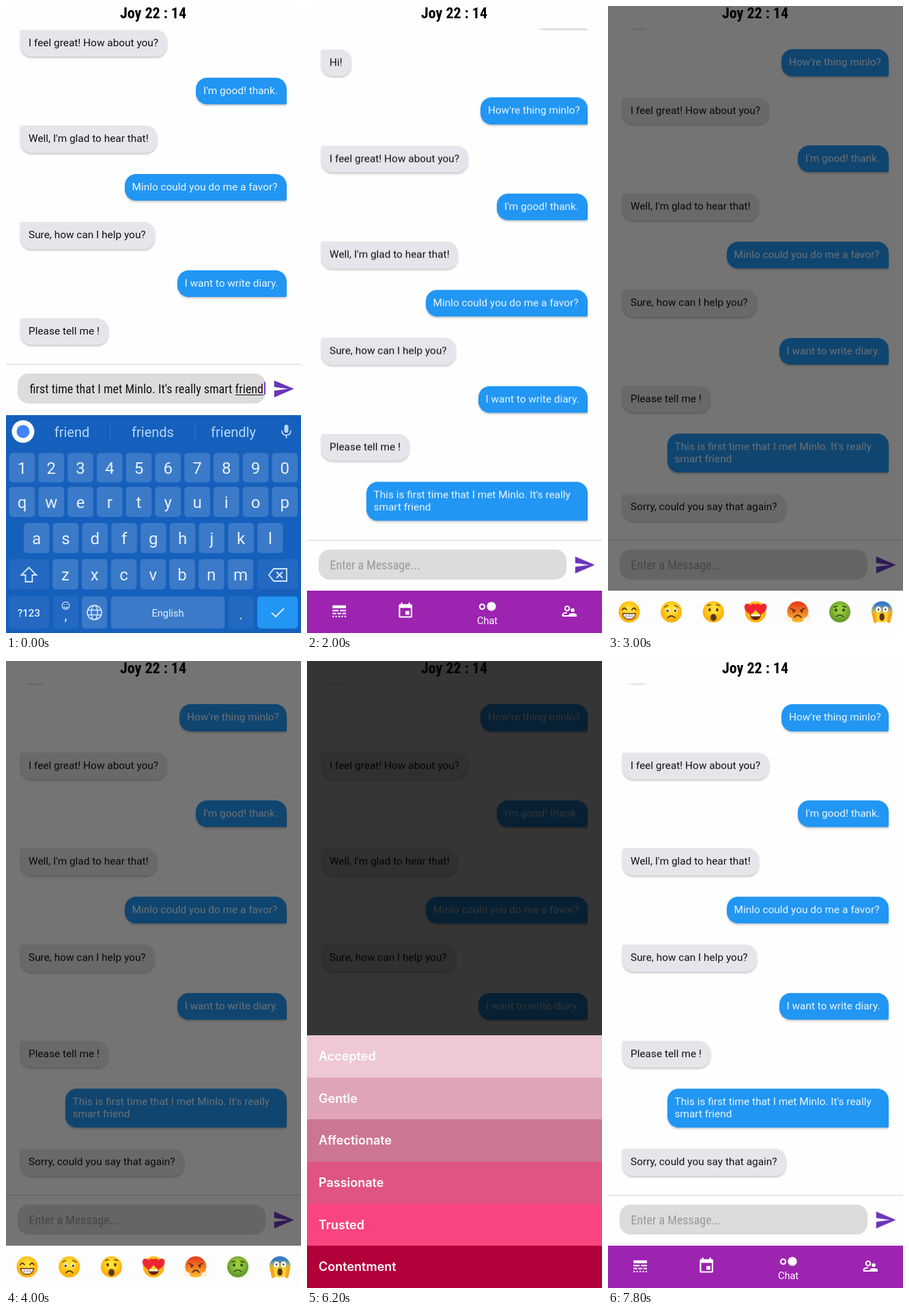
An HTML page that plays this animation: 432x918 px, repeating every 7.9 s.

```html
<!DOCTYPE html>
<html lang="en">
<head>
<meta charset="utf-8">
<title>Diary chat</title>
<style>
html, body { margin: 0; width: 100%; height: 100%; overflow: hidden; background: #fefefe; }
#stage { position: absolute; left: 0; top: 0; width: 432px; height: 918px; overflow: hidden;
  background: #fefefe; font: 15.4px/17.6px Roboto, sans-serif; color: #111; text-wrap: nowrap; }
#stage > *, #bar > * { position: absolute; }
#feed, #bar, #draft, #hint, #board, .dim, .sheet { animation: 7.9s step-end infinite; }

.narrow { font-family: "Roboto Condensed", Roboto, sans-serif; font-stretch: 75%; }
#title { left: 0; top: -3px; width: 431px; text-align: center; font-size: 22px; font-weight: 700; line-height: 27px; color: #000; }

#view { left: 0; top: 33px; width: 432px; height: 885px; overflow: hidden; }
#feed { position: absolute; top: -209.5px; left: 21px; width: 389.5px; animation-name: feed; }
.msg { box-sizing: border-box; margin-bottom: 31.03px; padding: 10.9px 0 10.9px 12px; background: #e6e5eb;
  border-radius: 3px 16.5px 16.5px; box-shadow: 0 2px 3px rgba(0,0,0,.22); }
.mine { margin-left: auto; padding-left: 11px; background: #2196f3; color: #eef7ff; border-radius: 16.5px 16.5px 2px 16.5px; }

#bar { left: 0; top: 523.5px; width: 432px; height: 76px; background: #fefefe; animation-name: bar; }
#bar::before { content: ""; position: absolute; top: 0; width: 432px; height: 1px; background: #d2d2d2; }
#field { left: 17px; top: 14.5px; width: 363px; height: 43.5px; border-radius: 16px; background: #dcdcdc; overflow: hidden; font-size: 18px; line-height: 45px; }
#draft { position: absolute; left: 16px; right: 0; height: 44px; overflow: hidden; animation-name: gone; }
#draft span { position: absolute; right: 3px; width: max-content; }
#draft u { text-underline-offset: 2px; text-decoration-thickness: 1px; }
#draft i { position: absolute; right: 0; top: 12px; width: 2px; height: 19px; background: #8a35c8; }
#hint { position: absolute; left: 16.5px; color: #999; opacity: 0; animation-name: shown; }
#send { left: 390.3px; top: 20.5px; }

#nav { left: 0; top: 856px; background: #9c24b0; }
#board { left: 0; top: 599px; width: 432px; height: 319px; background: #1660bd; animation-name: board; }
.dim { inset: 0; background: #000; opacity: 0; }
.sheet { left: 0; bottom: 0; width: 432px; }
#moods { height: 62px; background: #fdfdfd; transform: translateY(62px); animation-name: moods; }
#dim1 { animation-name: dim1; }
#shades { transform: translateY(370px); animation-name: shades; }
#dim2 { animation-name: dim2; }
#shades div { height: 61.67px; padding-left: 17px; font: 600 18px/62px Inter, sans-serif; color: #fff; }

.a, .b, .grow { animation: 1.12857s ease-in-out infinite; }
.a { animation-name: poseA; } .b { animation-name: poseB; } .grow { animation-name: grow; }

@keyframes feed { 0% { transform: none } 3.8% { transform: translateY(169.6px) } 27.2%, 100% { transform: translateY(99.1px) } }
@keyframes bar { 0% { transform: none } 3.8%, 100% { transform: translateY(257.8px) } }
@keyframes gone { 0% { opacity: 1 } 3.8%, 100% { opacity: 0 } }
@keyframes shown { 0% { opacity: 0 } 3.8%, 100% { opacity: 1 } }
@keyframes board { 0% { transform: none } 3.8% { transform: none; animation-timing-function: ease-in } 7%, 100% { transform: translateY(320px) } }
@keyframes moods {
  0%, 28.73% { transform: translateY(62px); animation-timing-function: cubic-bezier(0,0,.2,1) }
  31.65%, 78.5% { transform: none; animation-timing-function: ease-in }
  81.6%, 100% { transform: translateY(62px) }
}
@keyframes dim1 {
  0%, 28.73% { opacity: 0; animation-timing-function: cubic-bezier(0,0,.2,1) }
  31.65%, 78.5% { opacity: .54; animation-timing-function: ease-in }
  81.6%, 100% { opacity: 0 }
}
@keyframes shades {
  0%, 55.7% { transform: translateY(370px); animation-timing-function: cubic-bezier(0,0,.2,1) }
  59.2%, 78.5% { transform: none; animation-timing-function: ease-in }
  81.6%, 100% { transform: translateY(370px) }
}
@keyframes dim2 {
  0%, 55.7% { opacity: 0; animation-timing-function: cubic-bezier(0,0,.2,1) }
  59.2%, 78.5% { opacity: .54; animation-timing-function: ease-in }
  81.6%, 100% { opacity: 0 }
}
@keyframes poseA { 0%, 32% { opacity: 1 } 40%, 75% { opacity: 0 } 85%, 100% { opacity: 1 } }
@keyframes poseB { 0%, 32% { opacity: 0 } 40%, 75% { opacity: 1 } 85%, 100% { opacity: 0 } }
@keyframes grow { 0%, 25% { transform: none } 45%, 65% { transform: scale(1.25) } 90%, 100% { transform: none } }
</style>
</head>
<body>
<div id="stage">
  <div id="view"><div id="feed"></div></div>
  <div id="title" class="narrow">Joy 22 : 14</div>
  <div id="bar">
    <div id="field" class="narrow">
      <div id="draft"><span>This is first time that I met Minlo. It's really smart <u>friend</u></span><i></i></div>
      <div id="hint">Enter a Message...</div>
    </div>
    <svg id="send" width="33" height="33" viewBox="0 0 24 24" fill="#6a35b8"><path d="M2 21L23 12 2 3v7l15 2-15 2z"/></svg>
  </div>
  <svg id="nav" width="432" height="62" fill="#fff">
    <g transform="translate(34 17) scale(1.1)">
      <path d="M3 4h18v4H3zM3 10h8v2H3zM13 10h8v2h-8zM3 14h5v2H3zM9.5 14h5v2h-5zM16 14h5v2h-5z"/>
      <path d="M3 19h18" stroke="#fff" stroke-width="2" stroke-dasharray="2"/>
    </g>
    <path transform="translate(131 16.5) scale(1.1)" d="M17 12h-5v5h5zM16 1v2H8V1H6v2H5a2 2 0 0 0-2 2v14a2 2 0 0 0 2 2h14a2 2 0 0 0 2-2V5a2 2 0 0 0-2-2h-1V1zm3 18H5V8h14z"/>
    <circle cx="256.5" cy="23.5" r="3.6" fill="none" stroke="#fff" stroke-width="2.2"/>
    <circle cx="270" cy="23" r="6.6"/>
    <text x="264" y="49" text-anchor="middle" font-size="14.5">Chat</text>
    <g fill="none" stroke="#fff" stroke-width="2.1">
      <circle cx="381" cy="26" r="3.2"/>
      <path d="M374.5 37v-1.5q0-3 6.5-3.3M374 37h9"/>
    </g>
    <circle cx="389" cy="28.5" r="2.8"/>
    <path d="M383 38v-2q0-3 6-3t6 3v2z"/>
  </svg>
  <svg id="board" width="432" height="319" viewBox="0 599 432 319" fill="#e6f1ff" text-anchor="middle" font-size="24"></svg>
  <div id="dim1" class="dim"></div>
  <svg id="moods" class="sheet" width="432" height="62">
    <defs>
      <radialGradient id="sun" cy=".4"><stop offset=".3" stop-color="#ffe034"/><stop offset="1" stop-color="#ffb10a"/></radialGradient>
      <radialGradient id="sick" cy=".4"><stop offset=".3" stop-color="#9ccc3c"/><stop offset="1" stop-color="#669d2c"/></radialGradient>
      <linearGradient id="rage" x2="0" y2="1"><stop offset=".1" stop-color="#e8431f"/><stop offset="1" stop-color="#ffbd2e"/></linearGradient>
      <linearGradient id="fear" x2="0" y2="1"><stop offset=".15" stop-color="#3479c8"/><stop offset=".6" stop-color="#ffd12e"/></linearGradient>
    </defs>
  </svg>
  <div id="dim2" class="dim"></div>
  <div id="shades" class="sheet"></div>
</div>
<script>
const $ = id => document.getElementById(id);

// text, bubble width, sent by the user
const messages = [
  ["Hello", 80, 1],
  ["Hi!", 43.5],
  ["How're thing minlo?", 156.5, 1],
  ["I feel great! How about you?", 214.5],
  ["I'm good! thank.", 132.5, 1],
  ["Well, I'm glad to hear that!", 199.5],
  ["Minlo could you do me a favor?", 237, 1],
  ["Sure, how can I help you?", 196.5],
  ["I want to write diary.", 160, 1],
  ["Please tell me !", 128.5],
  ["This is first time that I met Minlo. It's really<br>smart friend", 324, 1],
  ["Sorry, could you say that again?", 239.5]
];
$("feed").innerHTML = messages.map(([text, w, mine]) =>
  `<div class="msg ${mine ? "mine" : ""}" style="width:${w}px">${text.replace(/ /g, "&nbsp;")}</div>`).join("");

// keyboard
const text = (s, x, y, more = "") => `<text x="${x}" y="${y}" ${more}>${s}</text>`;
const key = (x, y, w, h, fill = "#fff", alpha = .16) =>
  `<rect x="${x - w / 2}" y="${y - h / 2}" width="${w}" height="${h}" rx="5" fill="${fill}" fill-opacity="${alpha}"/>`;
const row = (chars, x, y, h) => [...chars].map((c, i) =>
  key(x + 42.75 * i, y, 37.5, h) + text(c, x + 42.75 * i, y + 9)).join("");
const line = (d, w = 1.8) => `<path d="${d}" fill="none" stroke="#d6e8ff" stroke-width="${w}"/>`;

$("board").innerHTML =
  '<circle cx="25" cy="623" r="16.5" fill="#fff"/><circle cx="25" cy="623" r="9.5" fill="#4285f4"/>' +
  [["friend", 96.5], ["friends", 215], ["friendly", 333]]
    .map(([s, x]) => text(s, x, 631, 'font-size="20" fill="#b4d6fa"')).join("") +
  '<path d="M152.5 610v27M277.5 610v27" stroke="#2b71ca"/>' +
  '<rect x="407.5" y="613" width="6" height="12" rx="3" fill="#b4d6fa"/>' +
  line("M404 621.5q0 7 6.5 7t6.5-7M410.5 628v5", 1.6) +
  row("1234567890", 23.5, 676, 43) +
  row("qwertyuiop", 23.5, 726, 44) +
  row("asdfghjkl", 44.8, 779, 44) +
  row("zxcvbnm", 87, 832, 44) +
  key(33.5, 832, 59, 44, "#fff", .06) + line("M33.5 822l-11 11h6v10h10v-10h6z") +
  key(398, 832, 59, 44, "#fff", .06) + line("M385 833l7-9h19v18h-19zM396 828.5l9 9m0-9l-9 9") +
  key(33.5, 888, 59, 47, "#fff", .06) + text("?123", 33.5, 893.5, 'font-size="15" font-weight="500"') +
  key(87.5, 888, 37, 47, "#fff", .06) + text(",", 87.5, 899, 'font-size="20"') +
  '<circle cx="87.5" cy="878" r="5.3" fill="none" stroke="#d6e8ff" stroke-width="1.2"/>' +
  line("M84.5 879.5q3 3.5 6 0M85 876.5h1.5m2 0h1.5", 1.2) +
  key(129.5, 888, 37, 47) + '<circle cx="129.5" cy="888" r="10.5" fill="none" stroke="#d6e8ff" stroke-width="1.6"/>' +
  '<ellipse cx="129.5" cy="888" rx="4.5" ry="10.5" fill="none" stroke="#d6e8ff" stroke-width="1.4"/>' +
  line("M120 884.5h19m-19 7h19", 1.4) +
  key(237, 888, 166.5, 47) + text("English", 237, 893.5, 'font-size="14.5"') +
  key(344.2, 888, 37, 47, "#fff", .06) + text(".", 344, 898, 'font-size="20"') +
  key(397.7, 888, 59.5, 47, "#2196f3", 1) + line("M389 888.5l6 5.5 12-12", 2.2);

// emoji faces, each about the centre of a disc
const ink = "#5b3414";
const disc = fill => `<circle r="15.5" fill="url(#${fill})"/>`;
const stroke = (d, color = ink, w = 1.8) =>
  `<path d="${d}" fill="none" stroke="${color}" stroke-width="${w}" stroke-linecap="round"/>`;
const oval = (x, y, rx, ry, fill = ink) => `<ellipse cx="${x}" cy="${y}" rx="${rx}" ry="${ry}" fill="${fill}"/>`;
const pair = (x, y, rx, ry, fill) => oval(-x, y, rx, ry, fill) + oval(x, y, rx, ry, fill);
const pose = (name, body) => `<g class="${name}">${body}</g>`;
const heart = x => `<g transform="translate(${x} -4.5)"><path class="grow" fill="#ee2430" d="M0 7C-13-1-5-10 0-4 5-10 13-1 0 7z"/></g>`;

const faces = [
  disc("sun") + stroke("M-10-3q3-5 6 0M4-3q3-5 6 0") +
    `<path d="M-9.5 2.5h19q-1 8.5-9.5 8.5t-9.5-8.5z" fill="#fff" stroke="${ink}" stroke-width="1.3"/>` +
    stroke("M-8 6.3h16M-4 3v7M0 3v8M4 3v7", "#a88", .8),
  disc("sun") + stroke("M-10-7l5-2.5M10-7l-5-2.5", ink, 1.3) +
    pose("a", stroke("M-9-2q3 3 6 0M3-2q3 3 6 0M-4 8q4-4 8 0") +
      '<path d="M-8 1c-6 8-4 12 0 12s5-4 0-12z" fill="#4eb4ee"/>') +
    pose("b", pair(5.5, -2, 2.6, 3, "#fff") + pair(5.5, -1.5, 1.6, 2) + stroke("M-5 8.5q5-5 10 0")),
  disc("sun") + pair(5.5, -3, 1.8, 2.5) + stroke("M-9-9q3-2 5-1M9-9q-3-2-5-1", ink, 1.3) +
    pose("grow", oval(0, 6.5, 3.6, 4.2)),
  disc("sun") + '<path d="M-8 4h16q-1 8-8 8t-8-8z" fill="#67200f"/><path d="M-7 4h14l-1 2.5h-12z" fill="#fff"/>' + heart(-7.5) + heart(7.5),
  disc("rage") + stroke("M-10-5l6 3M10-5l-6 3") + pair(6, -.5, 1.6, 1.8) + stroke("M-5 8q5-6 10 0") +
    pose("grow", pair(10.5, 9, 4, 2.8, "#fff2e5") + pair(13, 6.5, 2.6, 2.3, "#fff2e5")),
  disc("sick") +
    pose("a", stroke("M-10-7l6 3-6 3M10-7l-6 3 6 3", "#29421a") + oval(0, 5, 6.5, 4.5, "#29421a") +
      '<path d="M-4 4h8l2 12q-6 2-12 0z" fill="#b9e63b"/>') +
    pose("b", pair(5.5, -2.5, 1.8, 2.2, "#29421a") + stroke("M-5 7q5-5 10 0M-9-7l5-1M9-7l-5-1", "#29421a", 1.5)),
  disc("fear") + pair(5.2, -3.5, 3.7, 4.3, "#fff") + pair(5.2, -3.5, 1.3, 1.5) +
    oval(0, 7.5, 3.7, 5.5) + stroke("M-12 3l2 11M12 3l-2 11", "#f4a51c", 5)
];
$("moods").innerHTML += faces.map((f, i) => `<g transform="translate(${31 + 61.7 * i} 31)">${f}</g>`).join("");

const shades = { Accepted: "#eec8d5", Gentle: "#dfa4b8", Affectionate: "#cc7693",
  Passionate: "#e05484", Trusted: "#f9447f", Contentment: "#b2003b" };
$("shades").innerHTML = Object.entries(shades).map(([name, c]) => `<div style="background:${c}">${name}</div>`).join("");
</script>
</body>
</html>
```
